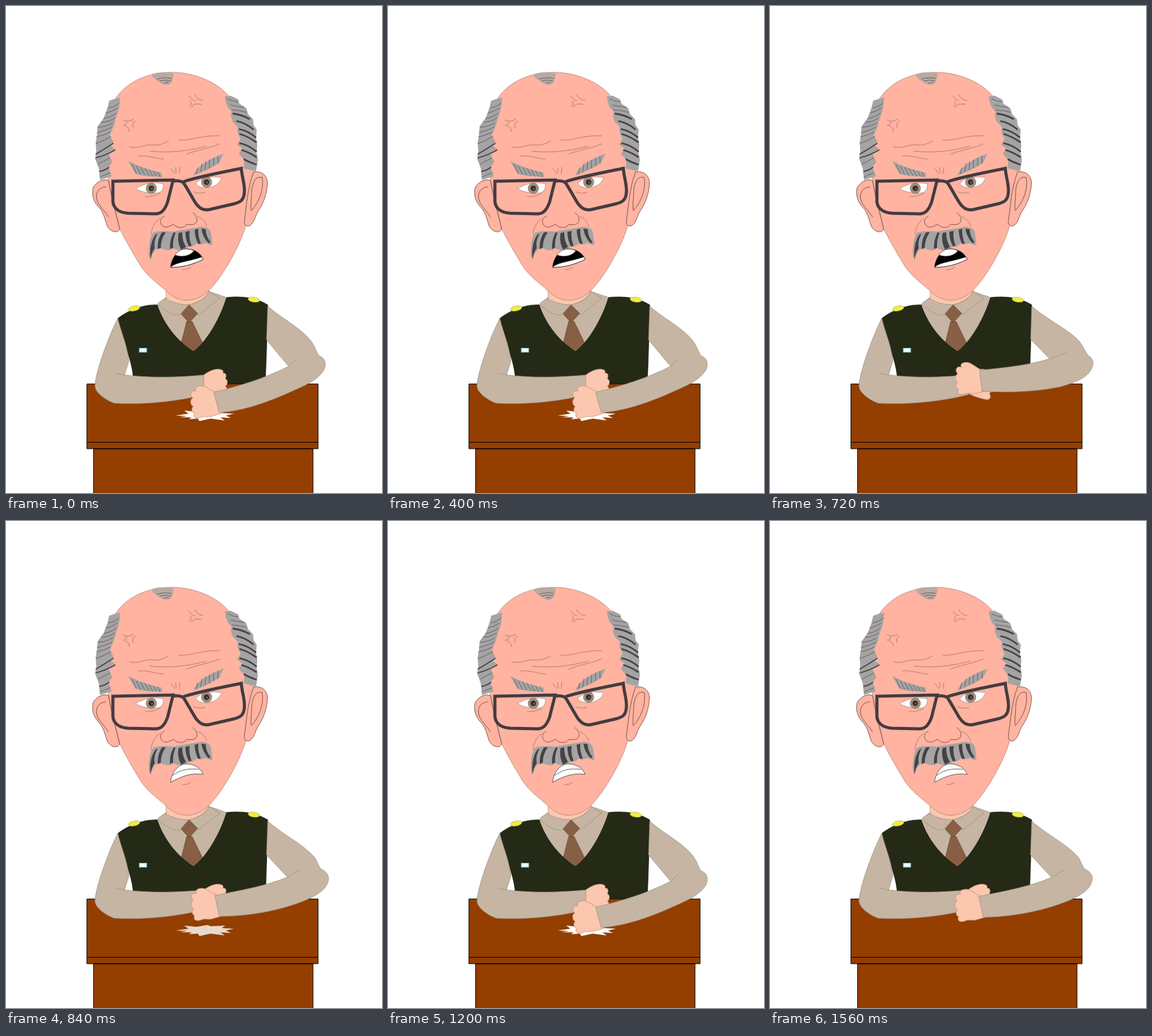
Animation, 612 px wide and 792 px high, one loop 1.6 s. Source, as an HTML page:

```html
<!DOCTYPE html>
<html lang="en">
<head>
<meta charset="utf-8">
<title>Angry officer</title>
<style>
  html, body { margin: 0; width: 100%; height: 100%; overflow: hidden; background: #fff; }
  svg { display: block; }
  path, ellipse { stroke-width: .7; }
  .line { fill: none; stroke: #94645a; }
  .face { fill: #ffb3a0; stroke: #a5766a; }
  .ear { fill: #ffb3a0; stroke: #3c2a26; }
  .skin { fill: #fbc7ae; stroke: #b58a76; }
  .shirt { fill: #c6b5a3; stroke: #94887b; }
  .hair { fill: #a5a3a3; stroke: none; }
  .strand { fill: none; stroke: #454245; }
  .wood { fill: #943e00; stroke: #000; }
  .tie { fill: #875f44; stroke: #6a4630; }
  .white { fill: #fff; stroke: #222; }
</style>
</head>
<body>
<svg width="612" height="792" viewBox="0 0 612 792">
  <!-- neck, shirt, tie, vest -->
  <path class="shirt" d="M246 486L260 474L330 464L359 474C349 508 326 547 305 562C277 544 256 516 246 486Z"/>
  <path class="skin" d="M260 454L261 478C273 484 286 487 298 486C314 482 330 472 331 460Z"/>
  <path class="shirt" d="M260 476C253 479 249 481 247 485C258 495 270 503 281 503L298 486C284 486 270 482 260 476ZM330 464L348 475L314 502L298 486C314 482 327 475 330 464Z"/>
  <path class="tie" d="M294 513H303L320 548L305 563L285 549ZM298 486L312 500L298 515L285 501Z"/>
  <path fill="#242a15" stroke="#14180c" d="M182 508C200 494 225 485 246 486C256 516 277 544 305 562C326 547 349 508 359 474C385 471 408 475 426 486C425 530 424 570 422 614H212L207 602C204 570 187 540 182 508Z"/>
  <g fill="#f0ec42" stroke="#b9ad55">
    <ellipse cx="208.500" cy="492" rx="9.500" ry="4" transform="rotate(-12 208 492)"/>
    <ellipse cx="403.500" cy="477.500" rx="9.500" ry="4" transform="rotate(8 403 477)"/>
  </g>
  <rect x="217" y="556.500" width="12" height="6.500" fill="#e9ffff" stroke="#83bfc2"/>

  <!-- head -->
  <path class="face" d="M172 162C190 122 235 106 275 108C308 109 345 124 364 148L392 190L403 270L390 358C381 390 353 440 330 463C310 482 284 484 265 467C242 447 231 440 220 424C204 398 194 380 185 362L167 284L160 205Z"/>
  <path class="ear" d="M167 284C160 280 148 285 142 295C139 305 142 317 149 325C158 334 160 343 164 356C168 367 181 371 185 363C181 345 172 315 167 284Z"/>
  <path class="ear" d="M403 270C412 268 424 272 425.500 286C426 300 420 320 412 331C405 341 405 352 397 357C392 360 387 356 388 349C391 330 393 295 403 270Z"/>
  <path class="line" style="stroke:#3c2a26" d="M163 294C151 295 145 304 148 315C150 324 158 330 167 343M417 279C407 276 402 285 400 299C400 312 398 320 399 332M417 279C420 297 413 318 399 333"/>

  <path class="hair" d="M186 149L177 151L168 154L165 166L159 182L149 196L148 210L146 222L147 237L145 248L151 264L153 283L172 277L167 262L173 254L167 240L179 234L169 226L175 221L169 210L175 196L179 182L184 167Z"/>
  <path class="strand" d="M167 166Q176 165 184 158M163 174Q173 172 181 166M159 183Q171 181 180 174M155 189Q167 189 177 182M150 197Q162 197 174 190M148 206Q160 203 173 197M147 213Q160 210 170 205M146 224Q160 219 171 212M150 257Q160 252 169 247M153 278Q162 274 170 271"/>
  <path class="strand" style="stroke-width:1.800" d="M146 241Q160 233 175 223M146 247Q162 243 178 234M152 269Q160 268 168 262"/>
  <path class="hair" d="M356 147L366 146L378 152L380 159L391 166L394 176L402 184L403 194L408 201L407 214L409 226L408 239L410 250L407 269L387 264L388 251L379 240L385 232L376 225L382 216L377 206L377 196L369 188L366 179L367 171L361 165L358 157Z"/>
  <path class="strand" d="M361 151Q368 155 378 156M365 161Q374 163 388 165M367 169Q378 169 392 173"/>
  <path class="strand" style="stroke-width:2.800" d="M369 175Q382 176 397 184M375 187Q390 190 403 201M379 200Q394 203 407 214M380 208Q394 212 408 222M380 223Q395 226 408 237M383 234Q396 238 408 246M387 249Q397 255 408 258"/>
  <path class="hair" style="fill:#b9a9a2" d="M237 111C249 107 262 107 273 110C273 117 270 122 268 126C262 130 255 128 250 124C244 120 238 117 237 111Z"/>
  <path class="strand" d="M246 119Q258 115 270 118M250 122Q259 119 269 122M257 126Q260 123 265 125"/>

  <path class="line" d="M201 229C217 233 225 224 240 226C252 227 260 222 265 219M281 218C300 220 315 210 348 211M234 236C262 239 292 237 326 228M215 244C230 242 242 248 257 249M294 241C310 234 330 232 348 224M268 264L275 273M276 262L277 272M283 262L282 273"/>
  <path class="line" d="M298 146Q301 153 308 154M321 154Q310 152 307 144M299 164Q303 158 300 154M302 165Q304 157 318 160M190 185Q198 190 208 184M211 187Q204 190 207 198M190 194Q198 193 196 188M193 195Q200 195 201 205"/>

  <path class="hair" d="M199 252C213 260 232 266 253 271L254 278C238 277 222 277 211 273C208 267 203 260 199 252ZM354 240L347 255C334 264 319 270 305 276C309 263 325 251 354 240Z"/>
  <path class="strand" d="M205 257L212 272M212 260L219 274M219 262L226 275M226 264L233 276M233 266L239 277M240 268L245 277M247 270L251 278M312 263L310 273M319 256L317 270M325 253L324 267M331 250L331 264M338 247L338 260M345 244L345 256"/>
  <path class="white" style="stroke:#9c8078" d="M211 297C225 288 240 286 256 289C257 296 254 302 248 304C235 305 220 303 211 297ZM309 289C315 280 331 276 351 279C348 288 340 294 330 295C322 297 312 294 309 289Z"/>
  <g id="iris"><circle cx="236.500" cy="296.500" r="8.500" fill="#a18d7b" stroke="#786a5d" stroke-width=".7"/><circle cx="236.500" cy="296.500" r="4.500" fill="#35302e"/><circle cx="237.500" cy="297" r="1.500" fill="#75685d"/></g>
  <use href="#iris" x="90" y="-10"/>
  <path class="line" d="M226 310Q240 311 251 304M305 302Q313 306 324 303"/>
  <path fill="none" stroke="#443b40" style="stroke-width:5" d="M174 285L272 283L263 319C258 333 252 338 243 338L199 337C184 336 175 329 174 318ZM271 285Q281 283 289 287M288 286C315 277 350 271 383 264C384 279 389 290 388 303C387 316 382 319 370 322L331 331C321 333 315 329 309 321C302 310 296 298 288 286Z"/>

  <path class="line" style="stroke:#4a302b" d="M258 342C250 344 249 355 257 359C263 361 268 357 273 355C278 362 291 362 294 355C300 356 310 357 311 348C311 342 307 338 304 336"/>
  <path class="line" d="M236 372C237 360 243 350 250 346M312 342Q323 347 327 358M287 429Q295 429 301 425"/>
  <path class="hair" d="M239 369C248 365 260 366 272 367C285 364 305 362 318 359C328 359 334 364 334 372L336 388C332 391 328 384 322 386C318 389 313 388 310 386C306 392 300 391 296 392C290 400 279 397 272 394C265 400 258 396 252 394C247 398 245 393 242 398C238 403 237 408 236 412C232 410 232 400 233 390C234 380 236 374 239 369Z"/>
  <path fill="#454245" d="M243 372Q233 386 235 411Q238 399 242 394Q240 381 247 370ZM254 368Q246 380 247 395L252 393Q252 379 260 368ZM273 368Q266 381 267 395L272 393Q271 381 276 369ZM281 369Q278 383 285 396L293 392Q286 380 287 368ZM292 367Q292 381 298 391L302 390Q297 378 299 366ZM307 364Q308 379 313 387L317 386Q312 374 313 362ZM318 362Q320 376 330 386L333 384Q325 374 325 363Z"/>

  <g id="closed">
    <path class="white" d="M268 425C269 409 281 394 295 395C309 396 317 403 321 412C300 409 284 416 268 425Z"/>
    <path class="line" style="stroke:#222" d="M271 414C284 404 298 402 314 404"/>
  </g>
  <g id="open">
    <path stroke="#111" d="M268 425C269 409 281 394 295 395C309 396 317 403 321 412C303 421 286 425 268 425Z"/>
    <path class="white" d="M275 405C282 394 296 393 306 398C301 405 289 410 275 405ZM268 425C275 417 295 416 319 408L321 412C303 421 286 425 268 425Z"/>
  </g>

  <!-- desk -->
  <path class="wood" style="stroke-width:1" d="M142.500 720H499.800V794H142.500ZM131.700 614.700H508V720H131.700ZM131.700 709.500H508"/>

  <!-- resting arm -->
  <path class="shirt" d="M182 508C170 530 147 590 145 616C143 627 160 640 176 646C225 649 280 643 323 632L322 600C280 604 235 605 193 600L200 577C197 550 187 530 182 508Z"/>
  <path class="line" style="stroke:#94887b" d="M178 597Q186 599 194 600"/>
  <path class="skin" d="M322 600C330 594 340 589 349 591C354 592 354 595 353 597C359 596 359 602 357 606C362 608 361 617 357 618C361 622 361 628 357 630C361 636 358 641 352 640C340 638 331 634 322 630Z"/>

  <path id="flash" fill="#fff" d="M276 666L297 663L290 658L310 660L328 657L333 659L357 658L351 662L371 663L358 666L366 670L349 669L356 674L333 671L315 675L312 671L298 672L302 669L283 669L295 667Z"/>
  <path id="fist" class="skin" d="M6 3C-6 -4 -13 -14 -20 -14C-28 -15 -31 -11 -29 -7C-37 -11 -41 -2 -36 3C-42 5 -42 14 -38 17C-42 20 -42 26 -38 28C-42 35 -37 38 -29 37C-24 35 -18 38 -12 38L6 36Z"/>
  <path id="arm" class="shirt"/>
  <path id="crease" class="line" style="stroke:#94887b"/>
</svg>
<script>
  const [closed, open, flash, fist, arm, crease] =
    ['closed', 'open', 'flash', 'fist', 'arm', 'crease'].map(id => document.getElementById(id));

  // Arm outlines by height; each ends with the sleeve crease
  const poses = [
    { at: 0, turn: -10, cuff: [339, 628], d: 'M426 488C450 510 488 527 501 552C507 564 508 569 512 570C520 574 522 583 517 593C505 611 480 620 460 629C425 645 380 660 347 661L338 628C380 618 420 606 460 586L424 543Z|M460 586Q467 580 473 574' },
    { at: .2, turn: -9, cuff: [340, 608], d: 'M426 488C450 510 485 526 503 548C508 557 510 564 513 566C525 572 528 580 522 592C515 606 490 617 465 625C425 638 380 643 347 643L340 609C385 600 425 593 458 579L424 543Z|M458 579Q469 573 479 567' },
    { at: .8, turn: 1, cuff: [344, 548], d: 'M426 488C455 513 490 525 507 541C517 550 524 560 528 572C532 578 530 586 522 594C514 604 500 607 485 606C430 604 380 592 340 584L344 549C385 557 415 560 447 560L425 540Z|M447 560Q470 559 490 555' }
  ];
  const STEP = 40, HIT = 10, TALK = 8;

  function raiseArm(height) {
    const [a, b] = height < .2 ? poses : poses.slice(1);
    const k = (height - a.at) / (b.at - a.at);
    const mix = (p, q) => p + (q - p) * k;
    const ends = b.d.match(/\d+/g);
    let i = 0;
    const [outline, fold] = a.d.replace(/\d+/g, n => mix(+n, +ends[i++]).toFixed(2)).split('|');
    arm.setAttribute('d', outline);
    crease.setAttribute('d', fold);
    const [x, y] = a.cuff.map((v, j) => mix(v, b.cuff[j]));
    fist.setAttribute('transform', `translate(${x} ${y}) rotate(${mix(a.turn, b.turn)})`);
  }

  function draw() {
    const step = Math.floor(performance.now() % 1600 / STEP);
    const beat = step % HIT;
    raiseArm(beat < 5 ? beat / 5 : (HIT - beat) * .184);
    flash.setAttribute('opacity', Math.max(0, 1 - beat / 5));
    const talking = step % TALK < TALK / 2;
    open.style.display = talking ? '' : 'none';
    closed.style.display = talking ? 'none' : '';
    requestAnimationFrame(draw);
  }
  draw();
</script>
</body>
</html>
```
